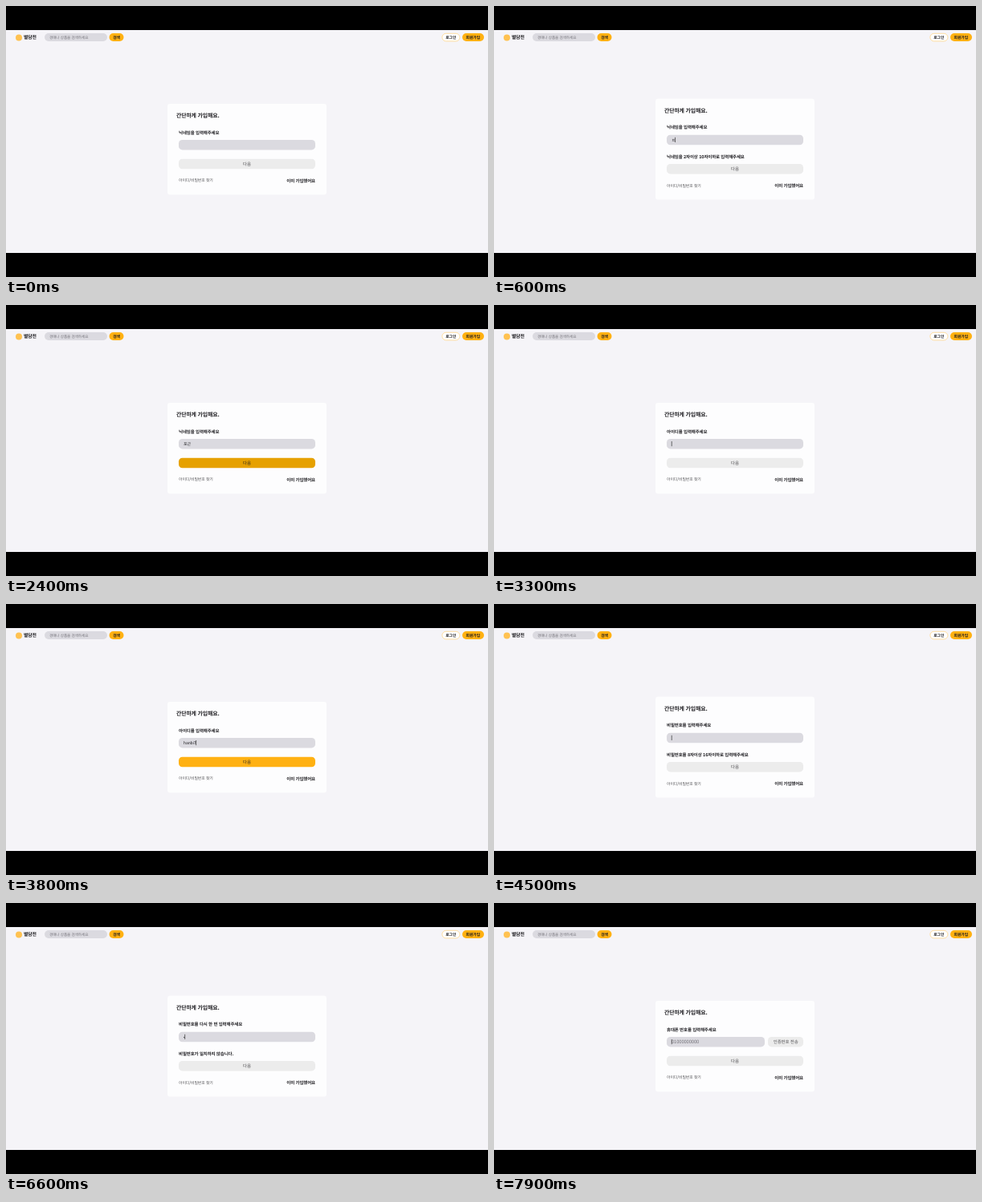
An HTML page that plays this animation: 600 px wide and 338 px high, repeating every 8 s.

```html
<!DOCTYPE html>
<html lang="ko">
<meta charset="utf-8">
<title>간단 가입</title>
<style>
  html, body { margin: 0; height: 100%; overflow: hidden; background: #000; }
  svg { display: block; width: 600px; height: 338px; }
  text {
    font: 5.45px 'Noto Sans CJK KR', 'Noto Sans CJK JP', 'Noto Sans CJK', sans-serif;
    letter-spacing: -.02em; fill: #1c1b1f; text-rendering: geometricPrecision; white-space: pre;
  }
  .bold { font-weight: 700; }
  .mid { text-anchor: middle; }
  .end { text-anchor: end; }
  .small { font-size: 4.85px; }
  .value { font-size: 5px; }
  .hint { fill: #76747b; }
  .grey { fill: #dbdae0; }
  .pale { fill: #ececec; }
  .gold { fill: #ffb112; }
  .dark { fill: #e6a100; }
</style>
<svg viewBox="0 0 600 338">
  <rect y="30" width="600" height="278" fill="#f5f4f8"/>

  <circle cx="16" cy="39.4" r="4" fill="#ffc251"/>
  <text class="bold" x="22" y="41.3" style="font-size:5.9px">별담전</text>
  <rect class="grey" x="48" y="34" width="78" height="10" rx="5"/>
  <text class="hint" x="54" y="40.8" style="font-size:4.65px">경매나 상품을 검색하세요</text>
  <rect class="gold" x="128.5" y="34" width="18" height="10" rx="5"/>
  <text class="small mid bold" x="137.5" y="40.8">검색</text>
  <rect x="542.9" y="34.3" width="22" height="9.6" rx="4.8" fill="#fff" stroke="#ffd27a" stroke-width=".7"/>
  <text class="small mid bold" x="553.8" y="40.9">로그인</text>
  <rect class="gold" x="568" y="34" width="27" height="10" rx="5"/>
  <text class="small mid bold" x="581.3" y="40.9">회원가입</text>

  <rect id="card" x="201" width="198" rx="3" fill="#fdfdfe"/>
  <g id="upper">
    <text class="bold" x="212" y="139" style="font-size:6.9px">간단하게 가입해요.</text>
    <text id="label" class="bold" x="215" y="159.6"></text>
    <rect id="field" class="grey" x="215" y="167" height="12.4" rx="4.5"/>
    <text id="phone" class="hint" x="221" y="175.2" style="font-size:5.8px">01000000000</text>
    <text id="value" class="value" x="221" y="175"></text>
    <rect id="caret" y="170" width=".7" height="6.2" fill="#333"/>
    <g id="send">
      <rect class="pale" x="341" y="167" width="44" height="12.4" rx="4.5"/>
      <text class="mid" x="363.2" y="175.1" fill-opacity=".75">인증번호 전송</text>
    </g>
  </g>
  <text id="error" class="bold" x="215" y="189.6"></text>
  <g id="lower">
    <rect id="next" x="215" y="190.8" width="170" height="12.4" rx="4.5"/>
    <text id="nextText" class="mid" x="300" y="199">다음</text>
    <text x="215" y="219.4" style="font-size:4.9px" fill-opacity=".75">아이디/비밀번호 찾기</text>
    <text class="bold end" x="385" y="219.6">이미 가입했어요</text>
  </g>
</svg>
<script>
const $ = id => document.getElementById(id);
const LOOP = 8000, SHIFT = 6.2;

const step = (label, extra) => ({ label, value: '', error: '', button: 'pale', caret: false, phone: false, ...extra });
const valid = { error: '', button: 'gold' };
const hover = { button: 'dark', caret: false };
const fail = error => ({ error, button: 'pale' });
const type = (start, gap, values) => values.map((value, i) => [start + i * gap, { value }]);
const dots = (from, to) => Array.from({ length: to - from + 1 }, (_, i) => '•'.repeat(from + i));

const tooShort = '닉네임을 2자이상 10자이하로 입력해주세요';

// Each entry changes part of the form state from its time on.
const timeline = [
  [0, step('닉네임을 입력해주세요')],
  [200, { caret: true }],
  [300, fail(tooShort)],
  ...type(600, 80, ['ㅍ', '포', '포ㄱ']),
  [820, { value: '포근', ...valid }],
  ...type(900, 70, ['포근ㅎ', '포근한']),
  [1050, { value: '포근한달', ...fail('닉네임이 중복되었습니다.') }],
  [1700, { value: '포근한' }],
  [2000, { value: '포근', ...valid }],
  [2400, hover],

  [3000, step('아이디를 입력해주세요')],
  [3200, { caret: true }],
  [3400, fail('아이디를 6자이상 16자이하로 입력해주세요')],
  ...type(3450, 60, ['h', 'ha', 'han', 'hanb', 'hanbi']),
  [3800, { value: 'hanbi7', ...valid }],
  [4000, hover],

  [4300, step('비밀번호를 입력해주세요')],
  [4400, { caret: true, ...fail('비밀번호를 8자이상 16자이하로 입력해주세요') }],
  ...type(4700, 130, dots(1, 7)),
  [5700, { value: '•'.repeat(8), ...valid }],
  [5800, hover],

  [6000, step('비밀번호를 다시 한 번 입력해주세요')],
  [6200, { caret: true }],
  [6400, fail('비밀번호가 일치하지 않습니다.')],
  ...type(6600, 100, dots(1, 3)),
  ...type(7000, 100, dots(4, 6)),
  [7400, { value: '•'.repeat(8), ...valid }],
  [7600, hover],

  [7800, step('휴대폰 번호를 입력해주세요', { phone: true })],
  [7900, { caret: true }],
];

const stateAt = ms => Object.assign({}, ...timeline.filter(([at]) => at <= ms).map(([, change]) => change));
const show = (id, on) => $(id).setAttribute('visibility', on ? 'visible' : 'hidden');
const move = (id, dy) => $(id).setAttribute('transform', `translate(0 ${dy})`);

function draw(s) {
  const shift = s.error ? SHIFT : 0;
  $('card').setAttribute('y', 122 - shift);
  $('card').setAttribute('height', 113.3 + 2 * shift);
  move('upper', -shift);
  move('lower', shift);
  for (const id of ['label', 'value', 'error']) $(id).textContent = s[id];
  $('field').setAttribute('width', s.phone ? 122 : 170);
  show('phone', s.phone);
  show('send', s.phone);
  $('next').setAttribute('class', s.button);
  $('nextText').setAttribute('fill-opacity', s.button === 'pale' ? .75 : .9);
  $('caret').setAttribute('x', 220.8 + (s.value ? $('value').getComputedTextLength() : 0));
  show('caret', s.caret);
}

let last = '';
function tick() {
  const state = stateAt(performance.now() % LOOP);
  const key = JSON.stringify(state);
  if (key !== last) draw(state);
  last = key;
  requestAnimationFrame(tick);
}
tick();
</script>
</html>
```
